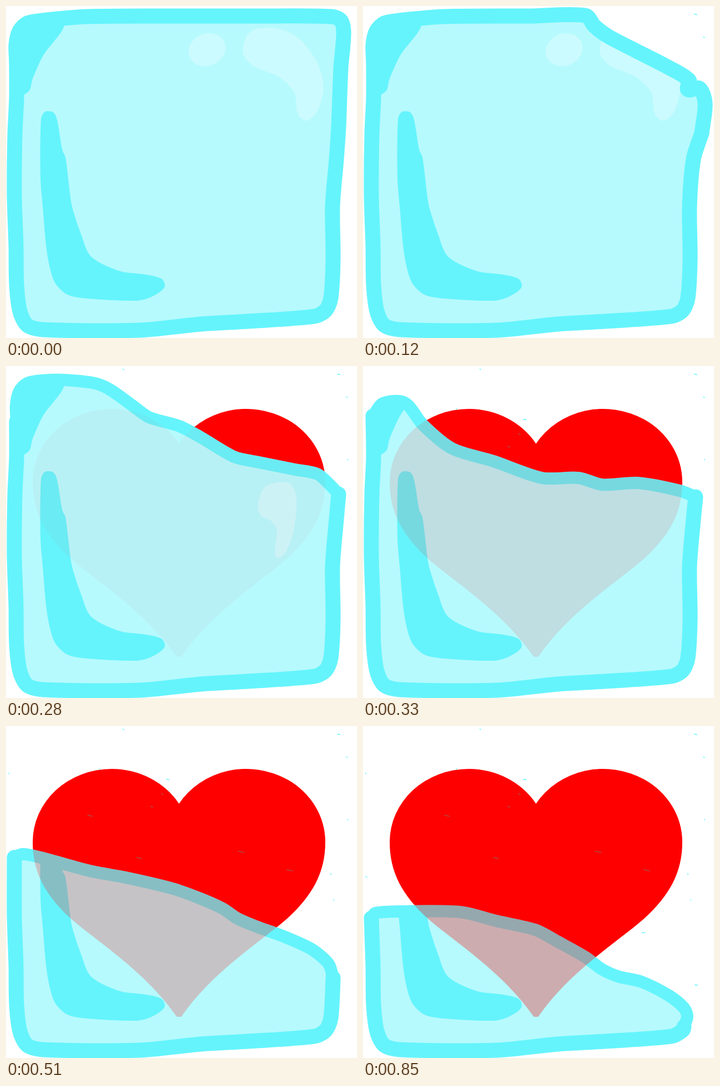
An HTML page with a canvas for the animation above (0.99 s loop, 631x596 px).

```html
<!DOCTYPE html>
<html lang="en">
<head>
<meta charset="utf-8">
<title>Melting ice heart</title>
<style>
  html, body { margin: 0; width: 100%; height: 100%; overflow: hidden; background: #fff; }
  canvas { display: block; }
</style>
</head>
<body>
<canvas id="stage" width="631" height="596"></canvas>
<script>
const W = 631, H = 596, PEN = 27, THIN = 22;
const RIM = '#65f4fc', ICE = '#b6fafe', SHINE = '#cbfbfe', RED = '#f00', SCRATCH = '#b04a48';

const ctx = document.getElementById('stage').getContext('2d');
const layer = document.createElement('canvas');
layer.width = W;
layer.height = H;
const ice = layer.getContext('2d');
ice.lineCap = ice.lineJoin = 'round';

// The rim is a brush line. Its sides and floor run from upper left round to upper right.
const sides = points(19,165, 16,230, 15,340, 18,430, 19,500, 25,548, 38,573, 66,581, 240,582,
  350,571, 435,566, 555,557, 575,546, 584,524, 588,455, 587,360, 594,275, 598,215, 602,110);

// Upper part of the rim at each stage of melting, left to right.
const corner = points(19,100, 18,70, 24,45, 38,31, 65,26);
const tops = {
  whole: [...corner, ...points(145,19, 300,18, 450,18, 586,19, 602,26, 607,45, 605,80)],
  chipped: [...corner, ...points(145,19, 300,18, 400,17, 416,36, 440,54, 490,80, 545,108, 586,133,
    584,150, 605,148, 615,175, 609,228)],
  sloped: [...corner, ...points(103,25, 160,31, 188,43, 230,73, 257,92, 312,108, 350,128, 410,163,
    450,172, 520,186, 560,194, 582,213, 598,230)],
  dipped: points(18,90, 36,67, 75,66, 108,106, 160,148, 235,171, 322,201, 388,201, 430,213, 495,210,
    570,224, 598,235),
  halved: points(20,150, 22,127, 87,130, 155,173, 200,205, 225,222, 250,223, 310,239, 378,259,
    418,279, 470,295, 545,309, 584,318, 587,350),
  low: points(15,236, 30,230, 62,236, 150,260, 215,272, 300,292, 350,310, 390,328, 415,345, 450,360,
    500,378, 550,401, 580,427, 588,452),
  puddle: points(15,345, 22,336, 62,333, 175,334, 240,350, 310,366, 350,387, 400,415, 430,437,
    460,450, 500,459, 550,484, 577,506, 583,521, 577,540)
};

const wedge = curve(points(19,160, 41,153, 48,130, 68,87, 102,42, 104,20, 45,28, 19,70), true);
const shade = curve(points(63,203, 70,190, 85,191, 92,205, 101,258, 107,272, 116,345, 120,365,
  135,410, 153,450, 205,476, 250,482, 280,490, 285,505, 262,522, 235,529, 145,525, 110,518, 87,495,
  74,445, 66,360, 62,310), true);
const crescent = curve(points(426,85, 433,53, 450,41, 495,42, 530,61, 560,103, 571,145, 560,188,
  541,206, 525,195, 518,155, 490,127, 445,108), true);
const glint = curve(points(453,250, 466,217, 508,210, 522,237, 516,300, 500,338, 485,343, 487,295,
  478,279, 458,268), true);
const oval = new Path2D();
oval.ellipse(361.5, 78.5, 34, 29, -0.4, 0, 2 * Math.PI);
const heart = makeHeart();

// Stray brush marks: the step in which each appears, and where.
const drops = [[1, 598, 15], [1, 613, 56], [2, 211, 6], [2, 614, 168], [3, 168, 77], [3, 291, 96],
  [4, 5, 85], [4, 584, 266], [5, 589, 312], [6, 6, 271], [6, 504, 371], [6, 599, 465]];
const scratches = [[3, 281, 122], [3, 262, 145], [4, 423, 226], [4, 510, 259], [5, 151, 161],
  [5, 239, 237]];

const steps = [
  { ms: 120, top: tops.whole, width: PEN, shines: [oval, crescent] },
  { ms: 90, top: tops.chipped, width: PEN, shines: [oval, crescent] },
  { ms: 120, top: tops.sloped, width: THIN, shines: [glint], tint: 0.035 },
  { ms: 90, top: tops.dipped, width: THIN, tint: 0.11 },
  { ms: 90, top: tops.halved, width: THIN, tint: 0.11 },
  { ms: 120, top: tops.low, width: THIN, tint: 0.22 },
  { ms: 360, top: tops.puddle, width: THIN, tint: 0.31 }
];
const loop = steps.reduce((sum, s) => sum + s.ms, 0);

function points(...flat) {
  const out = [];
  for (let i = 0; i < flat.length; i += 2) out.push([flat[i], flat[i + 1]]);
  return out;
}

// Soft curve through all points.
function curve(pts, closed) {
  const n = pts.length, path = new Path2D();
  const at = i => closed ? pts[(i + n) % n] : pts[Math.max(0, Math.min(n - 1, i))];
  const heading = i => Math.atan2(at(i + 1)[1] - at(i - 1)[1], at(i + 1)[0] - at(i - 1)[0]);
  path.moveTo(...pts[0]);
  for (let i = 0; i < (closed ? n : n - 1); i++) {
    const [px, py] = at(i), [qx, qy] = at(i + 1);
    const a = heading(i), b = heading(i + 1), k = Math.hypot(qx - px, qy - py) * 0.28;
    path.bezierCurveTo(px + k * Math.cos(a), py + k * Math.sin(a),
      qx - k * Math.cos(b), qy - k * Math.sin(b), qx, qy);
  }
  return path;
}

function makeHeart() {
  const p = new Path2D(), dip = Math.acos(121 / 142);
  p.moveTo(307, 522);
  p.bezierCurveTo(250, 440, 165, 388, 118, 347);
  p.bezierCurveTo(70, 304, 48, 262, 48, 208);
  p.ellipse(190, 208, 142, 131, 0, Math.PI, 2 * Math.PI - dip);
  p.ellipse(432, 208, 142, 131, 0, Math.PI + dip, 2 * Math.PI);
  p.bezierCurveTo(574, 262, 552, 304, 504, 347);
  p.bezierCurveTo(457, 388, 372, 440, 315, 522);
  p.closePath();
  return p;
}

function fill(c, path, color) {
  c.fillStyle = color;
  c.fill(path);
}

function brush(path, width) {
  ice.strokeStyle = RIM;
  ice.lineWidth = width;
  ice.stroke(path);
}

// Paints only where the layer already holds ice.
function onIce(paint, alpha = 1) {
  ice.save();
  ice.globalCompositeOperation = 'source-atop';
  ice.globalAlpha = alpha;
  paint();
  ice.restore();
}

function drawIce({ top, width, shines = [], tint = 0 }) {
  const first = top[0], last = top[top.length - 1];
  const rest = sides.filter(([x, y]) => y > (x < 300 ? first[1] : last[1]));
  ice.clearRect(0, 0, W, H);
  fill(ice, curve([...rest, ...top.slice().reverse()], true), ICE);
  onIce(() => {
    shines.forEach(s => fill(ice, s, SHINE));
    fill(ice, shade, RIM);
    fill(ice, wedge, RIM);
  });
  brush(curve([first, ...rest, last]), PEN);
  brush(curve(top), width);
  onIce(() => fill(ice, heart, RED), tint);
}

// Short dashes whose length and slant follow from their place.
function marks(list, index, color, size) {
  ctx.strokeStyle = color;
  ctx.lineWidth = 1.5;
  for (const [from, x, y] of list) {
    if (index < from) continue;
    const dx = size * (1 + 0.5 * Math.sin(x)), dy = size * 0.3;
    ctx.beginPath();
    ctx.moveTo(x - dx, y - dy);
    ctx.lineTo(x + dx, y + dy);
    ctx.stroke();
  }
}

function draw(index) {
  const step = steps[index];
  ctx.fillStyle = '#fff';
  ctx.fillRect(0, 0, W, H);
  if (step.tint) fill(ctx, heart, RED);
  marks(drops, index, RIM, 2);
  marks(scratches, index, SCRATCH, 4);
  drawIce(step);
  ctx.drawImage(layer, 0, 0);
}

const start = performance.now();
function tick() {
  let t = (performance.now() - start) % loop, i = 0;
  while (t >= steps[i].ms) t -= steps[i++].ms;
  draw(i);
  requestAnimationFrame(tick);
}
tick();
</script>
</body>
</html>
```
